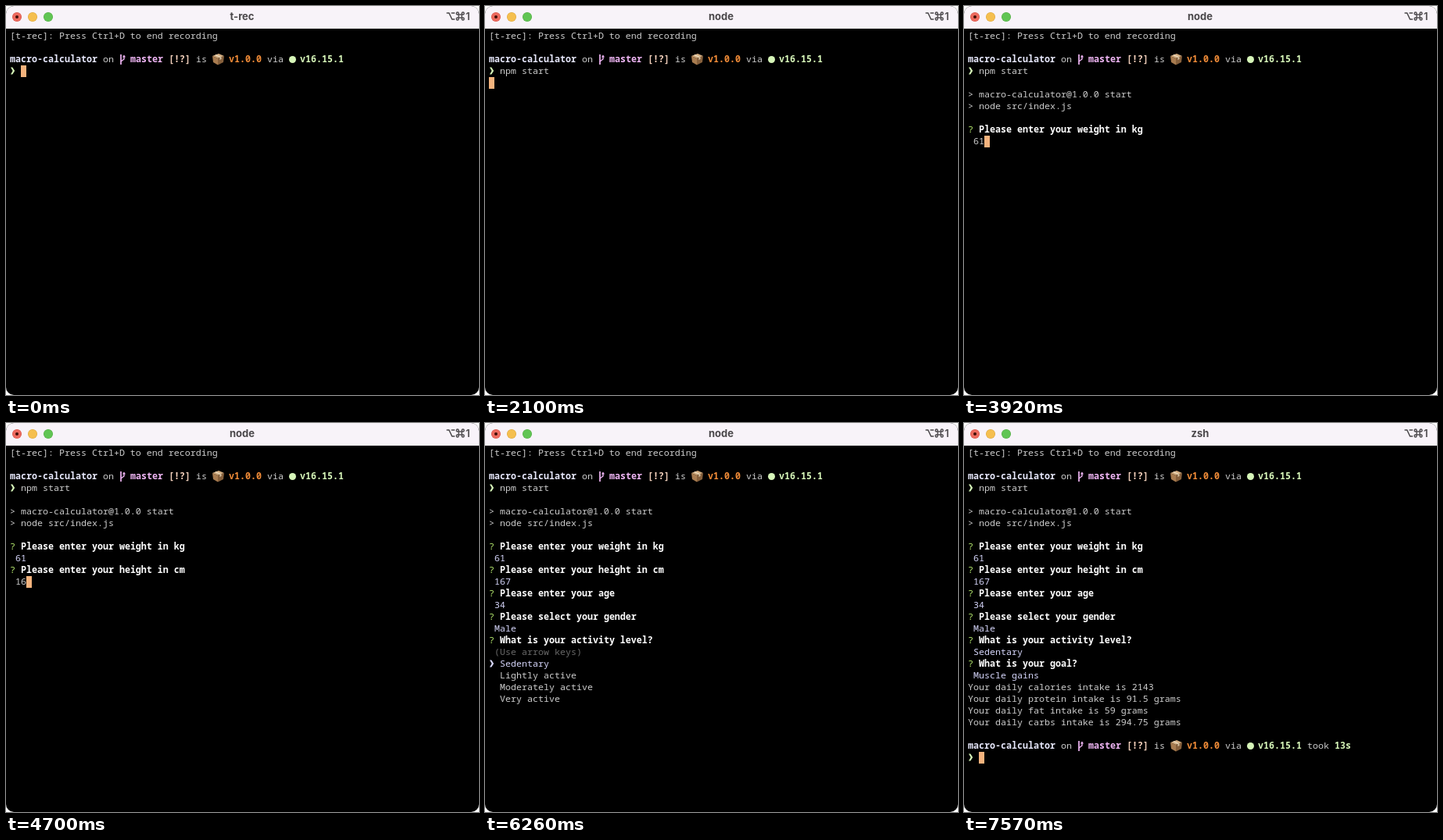
Recreate the animation shown at these times as an HTML page with a canvas. Size 605 by 498 pixels, loop 8 s.

```html
<!DOCTYPE html>
<html lang="en">
<head>
<meta charset="utf-8">
<title>Terminal</title>
<style>
html, body { margin: 0; width: 100%; height: 100%; overflow: hidden; background: #fff; }
canvas { display: block; width: 605px; height: 498px; }
</style>
</head>
<body>
<canvas id="stage"></canvas>
<script>
const W = 605, H = 498, LOOP = 8000;
const BAR = 29, RADIUS = 10;
const LEFT = 5, TOP = 31, CELL = 7, LINE = 15;
const MONO = '11.667px "Noto Sans Mono", "DejaVu Sans Mono", monospace';
const C = {
  text: '#cdcdcd', white: '#ffffff', dim: '#686868', lilac: '#d6d6fb',
  dir: '#e6e7fb', pink: '#f0b6f5', peach: '#f3d0bb', orange: '#ee8a37',
  lime: '#d6f5b8', green: '#b9ee70', cursor: '#f4b37d', title: '#4a474a'
};

const canvas = document.getElementById('stage');
const ctx = canvas.getContext('2d');
const dpr = window.devicePixelRatio || 1;
canvas.width = W * dpr;
canvas.height = H * dpr;

const colX = col => LEFT + col * CELL;
const rowY = row => TOP + row * LINE;

function put(row, col, text, color = C.text, bold = false) {
  ctx.font = (bold ? 'bold ' : '') + MONO;
  ctx.fillStyle = color;
  ctx.fillText(text, colX(col), rowY(row) + 11);
}

function cursor(row, col) {
  ctx.fillStyle = C.cursor;
  ctx.fillRect(colX(col), rowY(row), CELL, LINE);
}

function shape(color, ...pts) {
  ctx.fillStyle = color;
  ctx.beginPath();
  pts.forEach(([x, y]) => ctx.lineTo(x, y));
  ctx.fill();
}

function line(color, width, ...pts) {
  ctx.strokeStyle = color;
  ctx.lineWidth = width;
  ctx.beginPath();
  pts.forEach(([x, y]) => ctx.lineTo(x, y));
  ctx.stroke();
}

function dot(x, y, r, color) {
  ctx.fillStyle = color;
  ctx.beginPath();
  ctx.arc(x, y, r, 0, Math.PI * 2);
  ctx.fill();
}

function chevron(row, color) {
  const x = LEFT + 1, y = rowY(row) + 7;
  shape(color, [x, y - 4.5], [x + 2.3, y - 4.5], [x + 5.2, y],
    [x + 2.3, y + 4.5], [x, y + 4.5], [x + 2.6, y]);
}

function branch(x, y) {
  line(C.pink, 1.7, [x + 2, y - 6], [x + 2, y + 7]);
  line(C.pink, 1.4, [x + 2, y + 3], [x + 6, y], [x + 6, y - 4]);
  shape(C.pink, [x + 3.8, y - 2.5], [x + 6, y - 5.5], [x + 8, y - 2.5]);
}

function parcel(x, y) {
  shape('#d3ad80', [x, y - 4], [x + 8, y - 7], [x + 15, y - 4], [x + 7, y - 1]);
  shape('#a87c50', [x, y - 4], [x + 7, y - 1], [x + 7, y + 7.5], [x + 1, y + 4]);
  shape('#86603c', [x + 7, y - 1], [x + 15, y - 4], [x + 14, y + 4], [x + 7, y + 7.5]);
  shape('#e6d3b4', [x + 3, y - 5.1], [x + 5, y - 5.9], [x + 11.5, y - 2.8], [x + 9.5, y - 2]);
  shape('#d8c3a2', [x + 9.5, y - 2], [x + 11.5, y - 2.8], [x + 11.5, y], [x + 9.5, y + 1]);
}

function prompt(row, took) {
  const mid = rowY(row) + 7;
  put(row, 0, 'macro-calculator', C.dir, true);
  put(row, 17, 'on');
  branch(colX(20), mid);
  put(row, 22, 'master', C.pink, true);
  put(row, 29, '[!?]', C.peach, true);
  put(row, 34, 'is');
  parcel(colX(37), mid);
  put(row, 40, 'v1.0.0', C.orange, true);
  put(row, 47, 'via');
  dot(366.5, mid + .5, 4.5, C.lime);
  put(row, 53, 'v16.15.1', C.lime, true);
  if (took) {
    put(row, 62, 'took');
    put(row, 67, took, C.lime, true);
  }
  chevron(row + 1, C.lime);
}

// Latest value of a [time, value] track.
const at = (track, t) => track.reduce((v, [start, next]) => t >= start ? next : v, track[0][1]);

const titles = [[0, 't-rec'], [250, 'zsh'], [2100, 'node'], [7570, 'zsh']];
const command = [[0, ''], [770, 'n'], [1040, 'npm'], [1310, 'npm '], [1570, 'npm st'], [1830, 'npm start']];
const ENTER = 2100, BANNER = 2360, RESULT = 7310, PROMPT = 7570;

const questions = [
  { start: 2880, end: 4180, ask: 'Please enter your weight in kg', answer: '61',
    typed: [[0, ''], [3660, '6'], [3920, '61']] },
  { start: 4180, end: 5220, ask: 'Please enter your height in cm', answer: '167',
    typed: [[0, ''], [4440, '1'], [4700, '16'], [4960, '167']] },
  { start: 5220, end: 6000, ask: 'Please enter your age', answer: '34',
    typed: [[0, ''], [5480, '3'], [5740, '34']] },
  { start: 6000, end: 6260, ask: 'Please select your gender', answer: 'Male',
    options: ['Male', 'Female'] },
  { start: 6260, end: 6780, ask: 'What is your activity level?', answer: 'Sedentary',
    options: ['Sedentary', 'Lightly active', 'Moderately active', 'Very active'] },
  { start: 6780, end: RESULT, ask: 'What is your goal?', answer: 'Muscle gains',
    options: ['Weight Loss', 'Muscle gains'], moved: 7040 }
];

const results = [
  'calories intake is 2143', 'protein intake is 91.5 grams',
  'fat intake is 59 grams', 'carbs intake is 294.75 grams'
];

function drawQuestion(q, row, t) {
  put(row, 0, '?', C.green);
  put(row, 2, q.ask, C.white, true);
  if (t >= q.end) {
    put(row + 1, 1, q.answer, C.lilac);
  } else if (q.typed) {
    const text = at(q.typed, t);
    put(row + 1, 1, text);
    cursor(row + 1, 1 + text.length);
  } else {
    const picked = t >= q.moved ? 1 : 0;
    if (!picked) put(row + 1, 1, '(Use arrow keys)', C.dim);
    q.options.forEach((name, i) => {
      const on = i === picked;
      if (on) chevron(row + 2 + i, C.lilac);
      put(row + 2 + i, 2, name, on ? C.lilac : C.text);
    });
  }
}

function drawSession(t) {
  put(0, 0, '[t-rec]: Press Ctrl+D to end recording');
  prompt(2);
  const text = at(command, t);
  put(3, 2, text);
  if (t < ENTER) return cursor(3, 2 + text.length);
  if (t < BANNER) return cursor(4, 0);

  put(5, 0, '> macro-calculator@1.0.0 start');
  put(6, 0, '> node src/index.js');
  if (t < questions[0].start) return cursor(8, 0);

  questions.forEach((q, i) => {
    if (t >= q.start) drawQuestion(q, 8 + i * 2, t);
  });
  if (t < RESULT) return;

  results.forEach((s, i) => put(20 + i, 0, 'Your daily ' + s));
  if (t < PROMPT) return cursor(24, 0);
  prompt(25, '13s');
  cursor(26, 2);
}

function optionKey(x, y) {
  line(C.title, 1.5, [x, y - 4], [x + 3.2, y - 4], [x + 7, y + 4], [x + 10.5, y + 4]);
  line(C.title, 1.5, [x + 6, y - 4], [x + 10.5, y - 4]);
}

function commandKey(x, y) {
  ctx.strokeStyle = C.title;
  ctx.lineWidth = 1.4;
  ctx.strokeRect(x - 2, y - 2, 4, 4);
  for (const sx of [-1, 1]) for (const sy of [-1, 1]) {
    ctx.beginPath();
    ctx.arc(x + sx * 3.5, y + sy * 3.5, 1.5, 0, Math.PI * 2);
    ctx.stroke();
  }
}

function light(x, fill, rim) {
  dot(x, 14, 6, rim);
  dot(x, 14, 5.5, fill);
}

function drawBar(title) {
  ctx.fillStyle = '#f8f3f9';
  ctx.fillRect(0, 0, W, BAR);
  light(14, '#ed6a5e', '#d6564c');
  dot(14, 14, 2, '#3f0d08');
  light(34, '#f5bf4f', '#d9a43c');
  light(54, '#61c554', '#52a842');
  ctx.fillStyle = C.title;
  ctx.font = 'bold 13px Inter, "Liberation Sans", sans-serif';
  ctx.textAlign = 'center';
  ctx.fillText(title, 302, 18);
  ctx.textAlign = 'left';
  optionKey(563.5, 13);
  commandKey(581, 13);
  ctx.font = '600 13px Inter, "Liberation Sans", sans-serif';
  ctx.fillText('1', 588, 17.5);
}

function frame(now) {
  const t = now % LOOP;
  ctx.setTransform(dpr, 0, 0, dpr, 0, 0);
  ctx.fillStyle = '#fff';
  ctx.fillRect(0, 0, W, H);
  ctx.save();
  ctx.beginPath();
  ctx.roundRect(0, 0, W, H, RADIUS);
  ctx.clip();
  ctx.fillStyle = '#000';
  ctx.fillRect(0, 0, W, H);
  drawBar(at(titles, t));
  drawSession(t);
  ctx.restore();
}

const origin = performance.now();
function tick() {
  frame(performance.now() - origin);
  requestAnimationFrame(tick);
}
tick();
</script>
</body>
</html>
```
